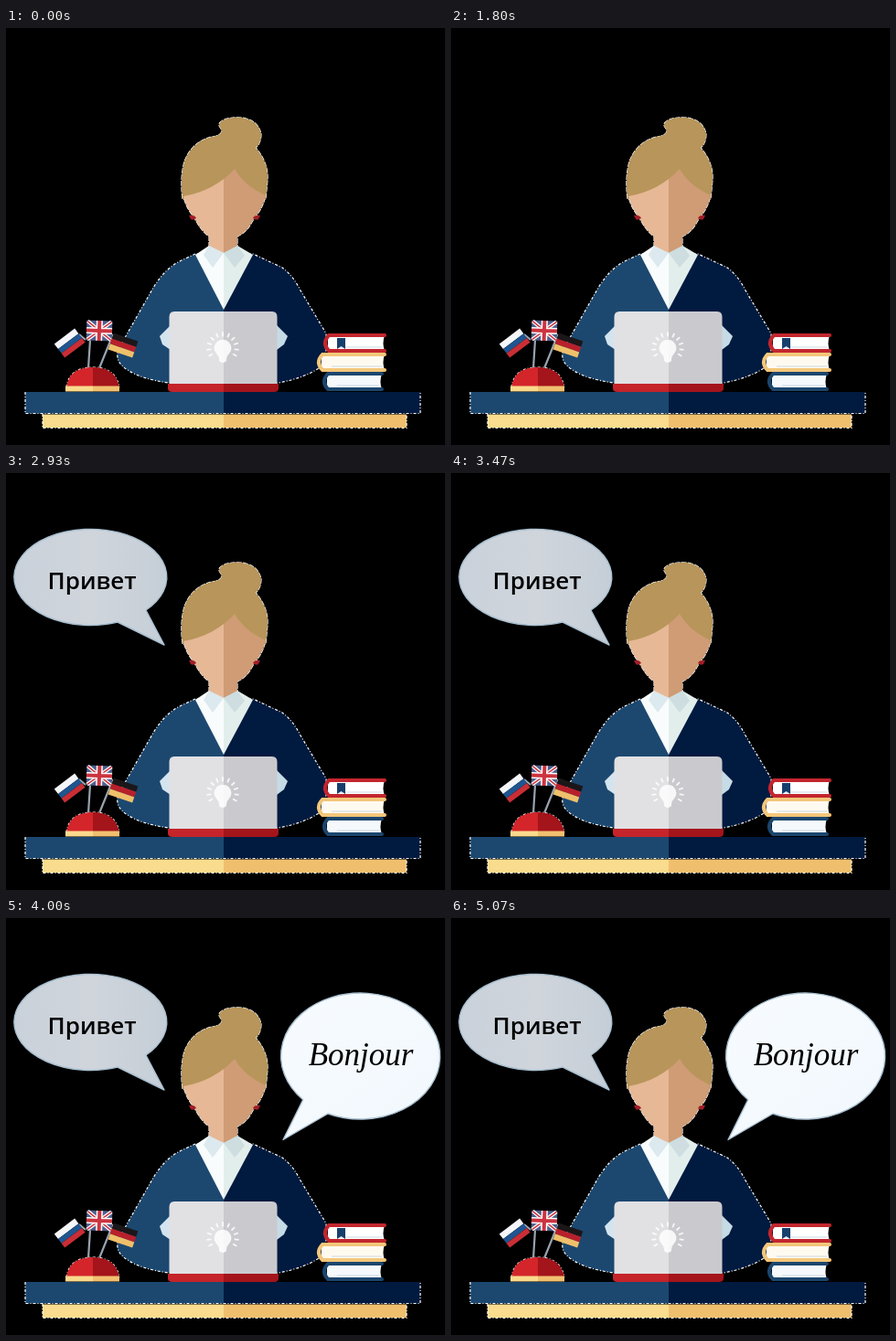
Write an HTML page that moves like this. It is 480x456 px and loops after 5.99 s.

```html
<!DOCTYPE html>
<html lang="en">
<head>
<meta charset="utf-8">
<title>Language tutor</title>
<style>
  html, body { margin: 0; width: 100%; height: 100%; overflow: hidden; background: #000; }
  svg { display: block; width: 480px; height: 456px; }
  .fringe { fill: none; stroke: #fff; stroke-width: 1.2; stroke-dasharray: 3 2 1 2; }
  .solid { stroke-dasharray: 6 1; }
  .bubble { stroke: #a9bfcf; stroke-width: 1.4; stroke-linejoin: round; }
  .hello { font: 600 26px "Open Sans", sans-serif; }
  .bonjour { font: italic 35px "Liberation Serif", serif; }
</style>
</head>
<body>
<svg viewBox="0 0 480 456">
  <defs id="defs">
    <linearGradient id="grey"><stop stop-color="#c9d1da"/><stop offset=".5" stop-color="#d0d5dc"/><stop offset="1" stop-color="#c5ced7"/></linearGradient>
    <linearGradient id="pale" y2="1"><stop stop-color="#f7fbff"/><stop offset="1" stop-color="#f1f8fd"/></linearGradient>
    <path id="jacket" d="M207 247 L190 255 Q174 263 161 284 L123 351 Q118 365 133 374 Q148 384 178 388 H298 Q325 383 342 372 Q352 364 350 334 L322 287 Q314 271 302 262 L270 247Z"/>
    <path id="hair" d="M193 187 Q190 164 195 146 Q204 122 230 118 Q238 115 235 110 Q230 105 237 101 Q245 97 258 98 Q276 101 279 116 Q279 126 273 131 Q287 147 286 166 L284 187Z"/>
    <path id="face" d="M194 184 Q228 178 250 154 Q261 173 284 183 Q281 197 272 207 L268 214 Q262 224 253 228 V239 L238 246 L222 239 V228 Q214 222 209 213 L205 206 Q197 197 194 184Z"/>
  </defs>

  <!-- teacher -->
  <use href="#jacket" fill="url(#navy)"/>
  <use href="#jacket" class="fringe"/>
  <use href="#hair" class="fringe solid"/>
  <use href="#face" class="fringe solid"/>
  <path fill="url(#shirt)" d="M207 248 L222 238 H253 L270 248 L238 308Z"/>
  <use href="#hair" fill="#b8955a"/>
  <use href="#face" fill="url(#skin)"/>
  <path fill="url(#collar)" d="M222 238 L216 248 L226 262 L238 246 L250 262 L261 249 L253 238 L238 246Z"/>
  <path fill="#a11d28" d="M200 205 q6 -1 8 3 q-4 3 -6 1Z M278 205 q-6 -1 -8 3 q4 3 6 1Z"/>
  <path fill="#d4e4ef" d="M180 325 L168 337 L171 346 L180 352Z"/>
  <path fill="#c5dbe6" d="M296 325 L308 337 L304 346 L296 352Z"/>

  <!-- laptop -->
  <path fill="url(#lid)" d="M178.500 389 V316 Q178.500 310 184 310 H291 Q296.500 310 296.500 316 V389Z"/>
  <path fill="url(#red)" d="M177 389 H298 V394 Q298 398 293 398 H182 Q177 398 177 394Z"/>
  <g fill="#fff" opacity=".85">
    <path d="M237 341 a9 9 0 0 1 7 15 q-3 3 -3 6 v2 q-4 4 -8 0 v-2 q0 -3 -3 -6 a9 9 0 0 1 7 -15Z"/>
    <g id="rays" stroke="#fff" stroke-width="1.800" stroke-linecap="round"></g>
  </g>

  <!-- desk -->
  <path fill="url(#navy)" d="M21 398 H453 V421.500 H21Z"/>
  <path fill="url(#yellow)" d="M40 422.500 H438 V437 H40Z"/>
  <path class="fringe" d="M21 398 V421.500 H453 V398 M40 422 V437.500 H438 V422"/>

  <!-- flags -->
  <path fill="none" stroke="#98a3ae" stroke-width="2.200" d="M90 372 L92 341 M102 372 L117 335 M80 335 L87 341"/>
  <g transform="translate(70 345) rotate(-37)">
    <path fill="#f4f6f9" d="M-14 -10 h28 v7 h-28Z"/>
    <path fill="#1f5590" d="M-14 -3 h28 v6 h-28Z"/>
    <path fill="#c92e35" d="M-14 3 h28 v6 h-28Z"/>
  </g>
  <g transform="translate(102 331) rotate(2)">
    <path fill="#4d5f8b" d="M-14 -11 h28 v22 h-28Z"/>
    <path stroke="#fff" stroke-width="4" d="M-13 -10 L13 10 M-13 10 L13 -10"/>
    <path stroke="#cc3440" stroke-width="1.500" d="M-13 -10 L13 10 M-13 10 L13 -10"/>
    <path stroke="#fff" stroke-width="7" d="M-14 0 H14 M0 -11 V11"/>
    <path stroke="#cc3440" stroke-width="4" d="M-14 0 H14 M0 -11 V11"/>
  </g>
  <g transform="translate(128 347) rotate(19)">
    <path fill="#1b1719" d="M-14 -9.500 h28 v6.500 h-28Z"/>
    <path fill="#b8202b" d="M-14 -3 h28 v6 h-28Z"/>
    <path fill="#efc06b" d="M-14 3 h28 v6.500 h-28Z"/>
  </g>
  <path class="fringe" d="M66 393 Q69 371 95 371 Q120 371 124 393"/>
  <path fill="url(#dome)" d="M66 393 Q69 371 95 371 Q120 371 124 393Z"/>
  <path fill="url(#base)" d="M65 391.500 H124 V397.500 H65Z"/>

  <g id="books"></g>
  <path fill="#173f6c" d="M362 339 h9 v12 l-4.500 -3 l-4.500 3Z"/>

  <!-- speech -->
  <g id="left">
    <path class="bubble" fill="url(#grey)" d="M122 163 A83.500 52.500 0 1 1 153 150 L173 188Z"/>
    <text class="hello" x="94" y="126.500" text-anchor="middle">Привет</text>
  </g>
  <g id="right">
    <path class="bubble" fill="url(#pale)" d="M324.700 198.700 A87 69 0 1 1 352 214 L303 242.500Z"/>
    <text class="bonjour" x="388" y="161" text-anchor="middle">Bonjour</text>
  </g>
</svg>
<script>
const $ = id => document.getElementById(id);
const LOOP = 5990;

// Two flat tones meeting at a vertical line.
const split = (id, light, dark, x = 238) =>
  `<linearGradient id="${id}" gradientUnits="userSpaceOnUse" x1="0" x2="480">
    <stop offset="${x / 480}" stop-color="${light}"/><stop offset="${x / 480}" stop-color="${dark}"/>
  </linearGradient>`;

$('defs').innerHTML +=
  split('navy', '#1c4870', '#011a40') +
  split('shirt', '#f8fcfc', '#e2eeec') +
  split('skin', '#e6b896', '#cf9c75') +
  split('collar', '#dce9ee', '#cddde0') +
  split('lid', '#e1e1e4', '#cacace') +
  split('red', '#c4242a', '#a4141b') +
  split('yellow', '#f9dc8d', '#efbf6e') +
  split('dome', '#d4252b', '#a4141b', 95) +
  split('base', '#f9da8d', '#f0c070', 95);

// Closed book lying flat, spine on the left.
const book = (x, y, w, h, cover, page) => `
  <path fill="${page}" d="M${x + 5} ${y + 2} H${x + w - 2} q-3 ${h / 2 - 2} 0 ${h - 4} H${x + 5}Z"/>
  <path fill="none" stroke="${cover}" stroke-width="4" stroke-linecap="round"
    d="M${x + w - 2} ${y + 2} H${x + 6} q-8 ${h / 2 - 2} 0 ${h - 4} H${x + w - 2}"/>
  <path stroke="#cbd8e2" d="M${x + 16} ${y + h - 6} H${x + w - 5}"/>`;

$('books').innerHTML =
  book(347, 334, 69, 21, '#c3262e', '#fff') +
  book(340, 355, 76, 21, '#f3c67a', '#fffaf0') +
  book(346, 376, 67, 21, '#1b466d', '#f5f9fc');

for (let a = -210; a <= 30; a += 24)
  $('rays').innerHTML += `<path d="M13.500 0 H17" transform="translate(237 350) rotate(${a})"/>`;

function draw() {
  const t = performance.now() % LOOP;
  $('left').style.display = t >= 2000 ? '' : 'none';
  $('right').style.display = t >= 4000 ? '' : 'none';
  requestAnimationFrame(draw);
}
draw();
</script>
</body>
</html>
```
